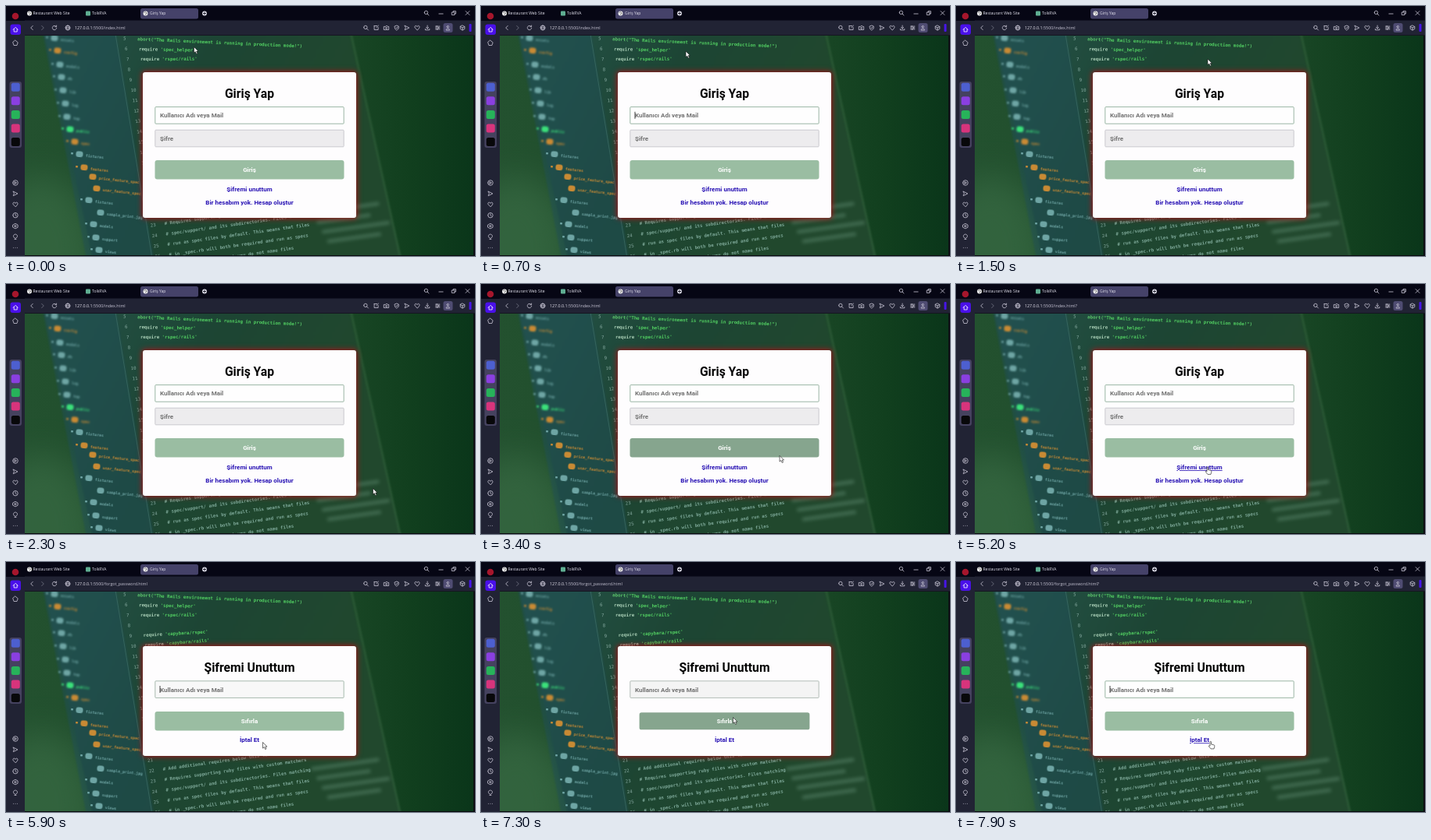
These frames come from a looping animation (600 px wide and 321 px high, 8000 ms). An HTML page:

```html
<!DOCTYPE html>
<html lang="tr">
<head>
<meta charset="utf-8">
<title>Giriş Yap</title>
<style>
  html, body { margin: 0; width: 100%; height: 100%; overflow: hidden; background: #08080d; }
  svg { display: block; width: 600px; height: 321px; }
  text { white-space: pre; }
  .ui { font: 5px "Open Sans", sans-serif; fill: #e4e3ee; }
  .url { font-size: 5.35px; }
  .form { font: 700 8px Roboto, sans-serif; }
  .form .title { font-size: 15.7px; fill: #050505; }
  .form .hint { fill: #717171; }
  .form .link { fill: #2711b4; }
  .mid { text-anchor: middle; }
  .code { font: 700 5.75px "DejaVu Sans Mono", monospace; }
  .icon { fill: none; stroke: #c9c7d6; stroke-width: .8; stroke-linecap: round; stroke-linejoin: round; }
</style>
</head>
<body>
<svg id="stage" viewBox="0 0 600 321" xmlns="http://www.w3.org/2000/svg"></svg>
<script>
const LOOP = 8000;
const stage = document.getElementById('stage');
const clamp = v => Math.max(0, Math.min(1, v));
const ease = v => { v = clamp(v); return v * v * (3 - 2 * v); };

const rect = (x, y, w, h, fill, r = 0, extra = '') =>
  `<rect x="${x}" y="${y}" width="${w}" height="${h}" rx="${r}" fill="${fill}" ${extra}/>`;
const dot = (x, y, r, fill) => `<circle cx="${x}" cy="${y}" r="${r}" fill="${fill}"/>`;
const text = (x, y, s, cls = '', extra = '') =>
  `<text x="${x}" y="${y}" class="${cls}" ${extra}>${s}</text>`;

// Line icons, each centred on its own origin
const shapes = {
  globe: 'M-3 0a3 3 0 1 0 6 0a3 3 0 1 0-6 0H3M0-3C-2-1-2 1 0 3C2 1 2-1 0-3',
  back: 'M1.3-2.6L-1.3 0L1.3 2.6',
  next: 'M-1.3-2.6L1.3 0L-1.3 2.6',
  reload: 'M2.2-1.6A2.7 2.7 0 1 0 2.7.4M2.6-3V-1.3H.9',
  search: 'M-2.8-.6a2.2 2.2 0 1 0 4.4 0a2.2 2.2 0 1 0-4.4 0M1 1L3 3',
  min: 'M-2.6 1H2.6',
  max: 'M-2.4-1H1V2.4H-2.4ZM-1-1V-2.4H2.4V1H1',
  close: 'M-2.4-2.4L2.4 2.4M2.4-2.4L-2.4 2.4',
  edit: 'M-2.5-2.5H1M2.5-.5V2.5H-2.5V-2.5M0 0L3-3',
  camera: 'M-3-1.6H-1L-.4-2.5H1L1.5-1.6H3V2.5H-3ZM-1 .4a1 1 0 1 0 2 0a1 1 0 1 0-2 0',
  shield: 'M-2.5-2L0-3L2.5-2V0C2.5 1.5 1 2.6 0 3C-1 2.6-2.5 1.5-2.5 0ZM-1 0L0 1L1.2-1',
  send: 'M-2.7-2.8L3 0L-2.7 2.8L-1.7 0Z',
  heart: 'M0 2.8L-2.8 0C-4-2.5-1-3.8 0-1.4C1-3.8 4-2.5 2.8 0Z',
  down: 'M0-3V1M-1.6-.5L0 1L1.6-.5M-2.7 1.4V2.8H2.7V1.4',
  tune: 'M-2.7-1.9H2.7M-2.7 0H2.7M-2.7 1.9H2.7M-1-2.6V-1.2M1.2-.7V.7M-.5 1.2V2.6',
  user: 'M-1.2-1.4a1.2 1.2 0 1 0 2.4 0a1.2 1.2 0 1 0-2.4 0M-2.2 2.7C-2 .2 2 .2 2.2 2.7Z',
  cube: 'M0-3L2.8-1.5V1.5L0 3L-2.8 1.5V-1.5ZM-2.8-1.5L0 0L2.8-1.5M0 0V3',
  home: 'M-3 0L0-3L3 0M-2-.8V2.7H2V-.8',
  star: 'M0-3.3L3.2-.7L2 3H-2L-3.2-.7Z',
  play: 'M-3.3 0a3.3 3.3 0 1 0 6.6 0a3.3 3.3 0 1 0-6.6 0M-.8-1.4L1.5 0L-.8 1.4Z',
  clock: 'M-3.2 0a3.2 3.2 0 1 0 6.4 0a3.2 3.2 0 1 0-6.4 0M0-1.8V0L1.3.9',
  gear: 'M-3.1-1.6L0-3.3L3.1-1.6V1.6L0 3.3L-3.1 1.6ZM-1.1 0a1.1 1.1 0 1 0 2.2 0a1.1 1.1 0 1 0-2.2 0',
  bulb: 'M-1.2 1.4C-4-1-2-3.4 0-3.4S4-1 1.2 1.4ZM-1 3H1',
  more: 'M-2.6 0h.01M0 0h.01M2.6 0h.01',
  plus: 'M-1.6 0H1.6M0-1.6V1.6'
};
const icon = (name, x, y, extra = '') =>
  `<path class="icon" d="${shapes[name]}" transform="translate(${x} ${y})" ${extra}/>`;
const favicon = x => dot(x, 9.5, 3, '#eee') +
  `<path d="M${x - 2} 8.5l2.2-.8 1.6 1.6-1.6.8.3 1.4" fill="none" stroke="#555" stroke-width=".7"/>`;

// Each line is turned about its own line number, as the monitor is seen at an angle
function codeLines() {
  const lines = {
    0: 'abort("The Rails environment is running in production mode!")',
    1: "require 'spec_helper'",
    2: "require 'rspec/rails'",
    4: "require 'capybara/rspec'",
    5: "require 'capybara/rails'",
    17: '# Add additional requires below this line. Rails is not',
    18: '# Requires supporting ruby files with custom matchers',
    19: '# spec/support/ and its subdirectories. Files matching',
    20: '# run as spec files by default. This means that files',
    21: '# in _spec.rb will both be required and run as specs',
    22: '# It is recommended that you do not name files'
  };
  let out = '';
  for (let i = 0; i < 23; i++) {
    const x = 150 + i * 1.95, y = 43.5 + i * 13.35, turn = Math.max(-8, 2.5 - i * 1.4);
    const body = (lines[i] || '').replace(/'.*'|".*"/, s => `<tspan fill="#52cf62">${s}</tspan>`);
    out += `<g transform="translate(${x} ${y}) rotate(${turn})">` +
      text(0, 0, i + 5, 'code', 'fill="#86aaa0" style="font-weight:400"') +
      text(18, 0, body, 'code', `fill="${i < 1 ? '#5cc46c' : i < 9 ? '#a9cfb6' : '#7da898'}"`) + '</g>';
  }
  return out;
}

function fileTree() {
  const orange = '#c88a34', teal = '#6ea5a4', lime = '#3be07a';
  const items = [
    [62, 41, teal, 'assets'], [66, 57, orange, 'config'], [69, 75, teal, 'models'],
    [71, 91, teal, 'db'], [73, 108, teal, 'lib'], [76, 125, teal, 'log'],
    [78, 142, teal, 'tmp'], [82, 158, lime, 'public'], [88, 174, orange, 'spec'],
    [94, 190, teal, 'fixtures'], [100, 207, orange, 'features'], [111, 219, orange, 'price_feature_spec'],
    [116, 234, orange, 'user_feature_spec'], [106, 249, teal, 'fixtures'], [121, 265, teal, 'sample_print.jpg'],
    [112, 280, teal, 'models'], [115, 297, teal, 'support'], [119, 313, teal, 'views']
  ];
  return items.map(([x, y, c, s], i) =>
    `<g transform="translate(${x} ${y}) rotate(6)" fill="${c}" filter="url(#${i < 9 ? 'soft' : 'fine'})">` +
    rect(-4.5, -3.5, 9, 7.5, c, 3) + (s.length > 10 ? '' : rect(-11, -1, 3, 2.4, c, 1)) +
    text(8, 2.5, s, 'code', 'style="font-size:4.8px"') + '</g>').join('');
}

const photo = () => `<g clip-path="url(#page)">
  ${rect(24, 38, 574, 282, 'url(#room)')}
  <ellipse cx="45" cy="318" rx="70" ry="100" fill="#3d7048" opacity=".6" filter="url(#haze)"/>
  <path d="M48 30H438L506 330H112Z" fill="url(#screen)" filter="url(#soft)"/>
  <path d="M46 30H140L190 330H104Z" fill="#204f55" opacity=".55" filter="url(#soft)"/>
  <path d="M440 30L506 330" stroke="#35633f" stroke-width="3" opacity=".6" filter="url(#soft)"/>
  <path d="M139 30L188 330" stroke="#4d7f74" stroke-width=".8" opacity=".6"/>
  <g transform="translate(400 262) rotate(-8)" fill="#6d9a80" opacity=".4" filter="url(#blur)">
    ${[0, 13, 26, 39].map((y, i) => rect(-10 + i * 5, y, 88 - i % 2 * 18, 5, '#6d9a80', 2)).join('')}</g>
  ${fileTree()}<g filter="url(#text)">${codeLines()}</g></g>`;

function chrome() {
  const tools = ['search', 'edit', 'camera', 'shield', 'send', 'heart', 'down', 'tune', 'user'];
  const side = ['play', 'send', 'heart', 'clock', 'gear', 'bulb', 'more'];
  const tiles = ['#4d5fd0', '#8a3fe0', '#27b35a', '#d8347c', '#08080a'];
  return rect(0, 0, 600, 19, '#060614') + rect(24, 18.5, 576, 19, '#212334') +
    rect(0, 19, 24, 302, '#212334') + rect(598, 38, 2, 283, '#0c0c13') + rect(24, 320, 576, 1, '#08080d') +
    rect(172, 3, 74, 13.5, '#454269', 2.5) +
    favicon(30) + favicon(178.5) + rect(102, 6.5, 6, 6, '#5fae92', 1) +
    text(34.5, 11.3, 'Restaurant Web Site', 'ui') + text(110, 11.3, 'TolkRVA', 'ui') +
    text(184, 11.3, 'Giriş Yap', 'ui') +
    dot(254, 9.5, 2.9, '#e4e3ee') + icon('plus', 254, 9.5, 'style="stroke:#060614"') +
    icon('search', 538, 9) + icon('min', 556.5, 9) + icon('max', 573, 9) + icon('close', 590.5, 9) +
    icon('back', 33, 28) + icon('next', 47, 28, 'opacity=".5"') + icon('reload', 62, 28) + icon('globe', 79, 28) +
    rect(559.5, 22, 12, 12, '#4f4c72', 2.5) +
    tools.map((n, i) => icon(n, 460.5 + i * 13.1, 28)).join('') +
    icon('cube', 584, 28) + rect(592.5, 23, 3, 10, '#4715e8', 1) +
    dot(12, 13, 4.3, '#a5162c') +
    rect(5.5, 23.5, 13.5, 13.5, '#4a10ea', 3) + icon('home', 12.2, 30.3, 'style="stroke:#fff"') +
    icon('star', 12, 47.5) +
    rect(4.5, 97, 15.5, 85, '#45425f', 3) +
    tiles.map((c, i) => rect(6.8, 98.7 + i * 17.6, 11, 11, c, 2.5)).join('') +
    side.map((n, i) => icon(n, 12, 227 + i * 13.9)).join('');
}

function field(y, hint, id) {
  return rect(190.8, y, 241.4, 21.6, '#edecee', 1, `id="${id}" stroke="#c0c0c6" stroke-width=".8"`) +
    text(197, y + 13.8, hint, 'hint');
}
const button = (y, label, id) =>
  `<g id="${id}">${rect(190.5, y, 242, 24.6, '#9abda2', 3)}${text(311.5, y + 15.1, label, 'mid', 'fill="#fff"')}</g>`;
const panel = (id, y, h, inner) => `<g id="${id}" class="form">
  ${rect(174, y - 1, 275, h + 2, '#a51218', 4, 'filter="url(#glow)"')}
  ${rect(175, y, 273, h, '#fefdfe', 3)}${inner}</g>`;

stage.innerHTML = `<defs>
  <clipPath id="page">${rect(24, 38, 574, 282, '#000')}</clipPath>
  <linearGradient id="room"><stop stop-color="#23512f"/><stop offset=".7" stop-color="#1a4726"/>
    <stop offset=".86" stop-color="#113f1e"/><stop offset="1" stop-color="#0a361a"/></linearGradient>
  <linearGradient id="screen" x2=".9" y2=".3"><stop stop-color="#26544a"/><stop offset=".5" stop-color="#1d4534"/>
    <stop offset="1" stop-color="#21482d"/></linearGradient>
  ${[['text', .45], ['fine', .6], ['soft', 1.2], ['blur', 2.2], ['haze', 22], ['glow', 3.6]].map(([id, s]) =>
    `<filter id="${id}" x="-50%" y="-50%" width="200%" height="200%" color-interpolation-filters="sRGB"><feGaussianBlur stdDeviation="${s}"/></filter>`).join('')}
  </defs>` + photo() + chrome() +
  `<text x="88" y="29.9" class="ui url">127.0.0.1<tspan fill="#c4c2d2">:5500/</tspan><tspan id="path" fill="#c4c2d2"></tspan></text>` +
  panel('login', 85, 187,
    text(311.5, 117.8, 'Giriş Yap', 'title mid') + field(129.6, 'Kullanıcı Adı veya Mail', 'field0') +
    field(159.2, 'Şifre', 'pass') + button(198, 'Giriş', 'button0') +
    text(311.5, 238.2, 'Şifremi unuttum', 'link mid', 'id="link0"') +
    text(311.5, 254.8, 'Bir hesabım yok. Hesap oluştur', 'link mid')) +
  panel('forgot', 108, 141,
    text(311.5, 140.8, 'Şifremi Unuttum', 'title mid') + field(152.8, 'Kullanıcı Adı veya Mail', 'field1') +
    button(192, 'Sıfırla', 'button1') + text(311.5, 231.4, 'İptal Et', 'link mid', 'id="link1"')) +
  rect(196.6, 0, .8, 9, '#111', 0, 'id="caret"') +
  `<g id="cursor" stroke="#111" stroke-width=".6" stroke-linejoin="round" fill="#fff">
    <path id="arrow" d="M0 0V7.6L1.8 6.1L3.1 9L4.5 8.4L3.2 5.6H5.5Z"/>
    <path id="hand" d="M1 .8C1-.4 2.6-.4 2.6.8V3.6L6 4.4C7 4.7 6.9 5.6 6.7 6.6L6 9.4H2L-.6 6.2C-1 5.4 0 4.8 1 5.8Z"/></g>`;

const el = id => document.getElementById(id);

// Page loads: time and address
const loads = [[-540, 'index.html'], [4150, 'index.html?'], [5700, 'forgot_password.html'], [7550, 'forgot_password.html?']];
const presses = [[3850, 4120], [7040, 7480]];
const route = [[0, 240.5, 52.5], [700, 262, 58], [1500, 322, 68], [2300, 469.5, 262.5], [2800, 497, 272], [3600, 361, 211],
  [4500, 361, 211], [5200, 320, 235], [5650, 326, 234], [5900, 328.5, 231.5], [6300, 336, 226],
  [6900, 322.5, 199.5], [7400, 322.5, 199.5], [7800, 324, 230.5], [8000, 324, 230.5]];
const buttonTop = [198, 192], fieldTop = [129.6, 152.8];
const links = [[282, 341, 230, 240], [299, 325, 224, 234]];

function pointer(t) {
  const i = Math.max(1, route.findIndex(p => p[0] > t));
  const [a, x, y] = route[i - 1], [b, u, v] = route[i];
  const k = ease((t - a) / (b - a));
  return [x + (u - x) * k, y + (v - y) * k];
}

const mix = (a, b, k) => `rgb(${a.map((v, i) => Math.round(v + (b[i] - v) * k))})`;

function draw(t) {
  const [loadTime, path] = loads.filter(l => l[0] <= t).pop();
  const page = t < 5700 ? 0 : 1;
  const [x, y] = pointer(t);
  const age = t - loadTime;

  el('path').textContent = path;
  el('login').style.display = page ? 'none' : '';
  el('forgot').style.display = page ? '' : 'none';

  let focus = clamp(age / 350), scale = 1, focused = true;
  for (const [down, up] of presses) {
    if (t < down) continue;
    scale = 1 - .1 * ease((t - down) / 150) + .1 * ease((t - up) / 120);
    if (t < up + 70) {
      focus *= 1 - clamp((t - down) / 350);
      focused = false;
    }
  }
  const input = el('field' + page);
  input.setAttribute('fill', mix([240, 240, 241], [254, 254, 254], focus));
  input.setAttribute('stroke', mix([172, 178, 176], [130, 165, 142], focus));
  const caret = el('caret');
  caret.setAttribute('y', fieldTop[page] + 6.2);
  caret.style.display = focused && age % 1060 < 530 ? '' : 'none';

  const top = buttonTop[page], mid = top + 12.3, b = el('button' + page);
  const over = x > 190 && x < 433 && y > top && y < top + 24.6;
  b.firstChild.setAttribute('fill', over ? '#86a58e' : '#9abda2');
  b.setAttribute('transform', `translate(311.5 ${mid}) scale(${scale}) translate(-311.5 ${-mid})`);

  const [l, r, u, d] = links[page];
  const onLink = x > l && x < r && y > u && y < d;
  el('link' + page).setAttribute('text-decoration', onLink ? 'underline' : 'none');
  el('arrow').style.display = onLink ? 'none' : '';
  el('hand').style.display = onLink ? '' : 'none';
  el('cursor').setAttribute('transform', `translate(${x} ${y})`);
}

const start = performance.now();
(function tick() {
  draw((performance.now() - start) % LOOP);
  requestAnimationFrame(tick);
})();
</script>
</body>
</html>
```
